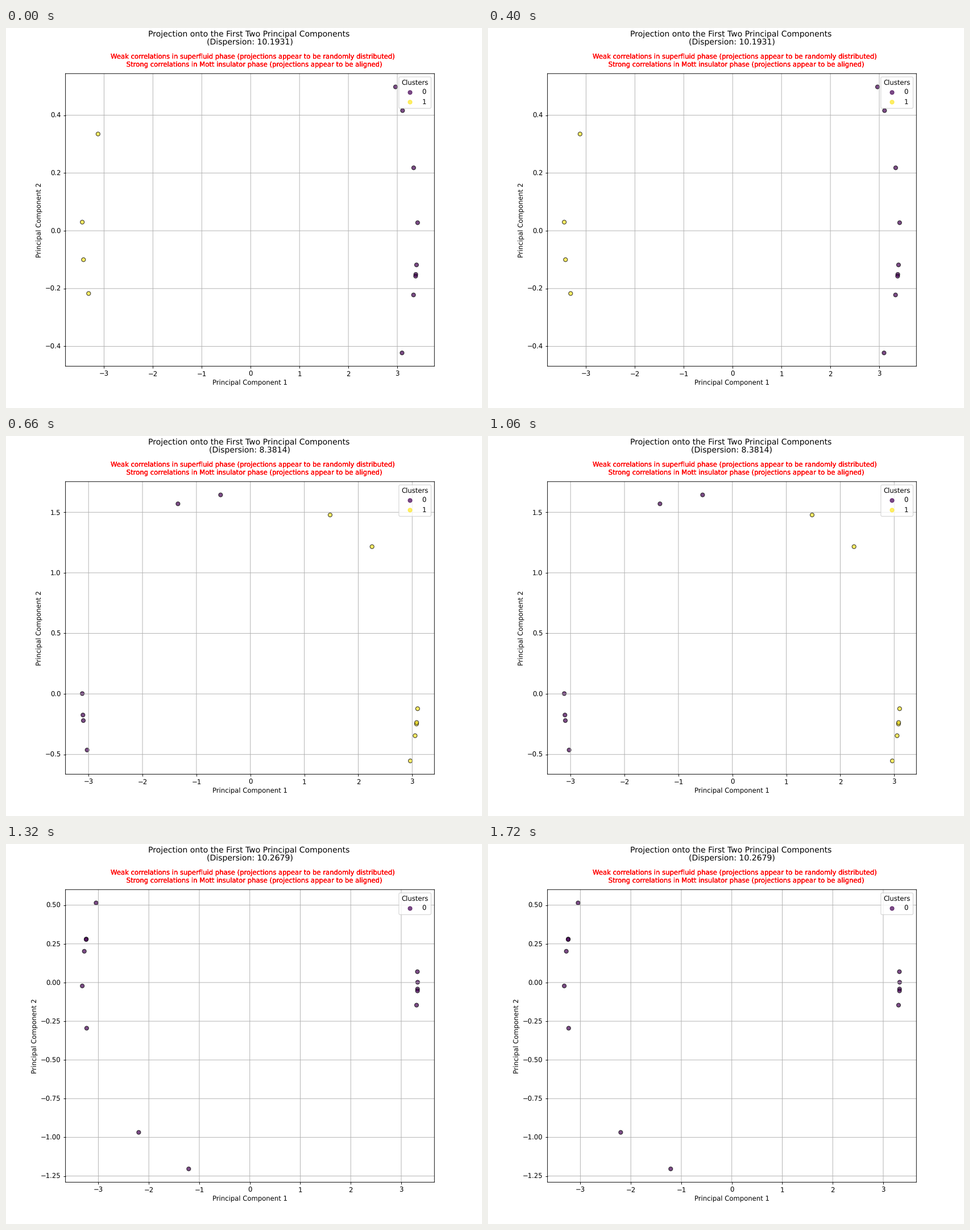
Write a matplotlib script that moves like this. It is 837 by 669 pixels and loops after 1.98 s.

```python
import matplotlib.pyplot as plt
from matplotlib.animation import FuncAnimation

WIDTH, HEIGHT = 837, 669
DPI = 83.7
STEP_MS = 660
EPS = 1e-6  # keeps the pixel size from being truncated downwards

# Soft, unsnapped edges for lines and glyphs
plt.rcParams.update({"font.family": "DejaVu Sans",
                     "text.hinting": "none",
                     "path.snap": False})


def arc(reach, half_height, heights, power=2):
    """Points at the given heights on one side of a (super)ellipse.

    A negative reach puts them on the left side.
    """
    return [(reach * (1 - (y / half_height) ** 2) ** (1 / power), y)
            for y in heights]


# Per step: dispersion, then one arc of points for each group
STEPS = [
    (10.1931, [
        arc(3.418, 1, [.498, .416, .218, .028, -.118, -.151, -.157,
                       -.222, -.4226]),
        arc(-3.448, .79, [.335, .03, -.1, -.217]),
    ]),
    (8.3814, [
        arc(-3.1165, 1.65, [1.6435, 1.57, .003, -.174, -.22, -.463], 2.8),
        arc(3.107, 1.58, [1.478, 1.216, -.122, -.248, -.236, -.345, -.553],
            2.8),
    ]),
    (10.2679, [
        arc(-3.319, 1.293, [.5145, .281, .278, .202, -.022, -.295, -.968,
                            -1.204])
        + arc(3.325, 1.293, [.07, .002, -.042, -.054, -.146]),
    ]),
]

fig, ax = plt.subplots(
    figsize=((WIDTH + EPS) / DPI, (HEIGHT + EPS) / DPI), dpi=DPI)


def caption(x, baseline, text, **style):
    """Centred line of text; baseline in pixels from the top."""
    return fig.text(x, 1 - baseline / HEIGHT, text, ha="center", **style)


# The spaces at line ends shift the centred lines slightly
caption(0.5125, 15, "Projection onto the First Two Principal Components ",
        fontsize=12)
dispersion_text = caption(0.5125, 29, "", fontsize=12)

# Overprinting gives the red note its heavier edges
for _ in range(3):
    caption(0.52, 53, "Weak correlations in superfluid phase "
            "(projections appear to be randomly distributed) ", color="red")
    caption(0.52, 67, " Strong correlations in Mott insulator phase "
            "(projections appear to be aligned)", color="red")


def draw(step):
    dispersion, clusters = STEPS[step]
    points = [p for cluster in clusters for p in cluster]
    labels = [k for k, cluster in enumerate(clusters) for _ in cluster]

    ax.clear()
    dots = ax.scatter(*zip(*points), c=labels, cmap="viridis",
                      edgecolors="k", alpha=0.7)
    ax.set_xlabel("Principal Component 1", labelpad=3)
    ax.set_ylabel("Principal Component 2")
    ax.grid(True)
    ax.legend(*dots.legend_elements(), title="Clusters", loc="upper right",
              labelspacing=0.37)
    dispersion_text.set_text(f"(Dispersion: {dispersion:.4f})")
    return []


anim = FuncAnimation(fig, draw, frames=len(STEPS), interval=STEP_MS,
                     init_func=lambda: draw(0), repeat=True, repeat_delay=0)
plt.show()
```
